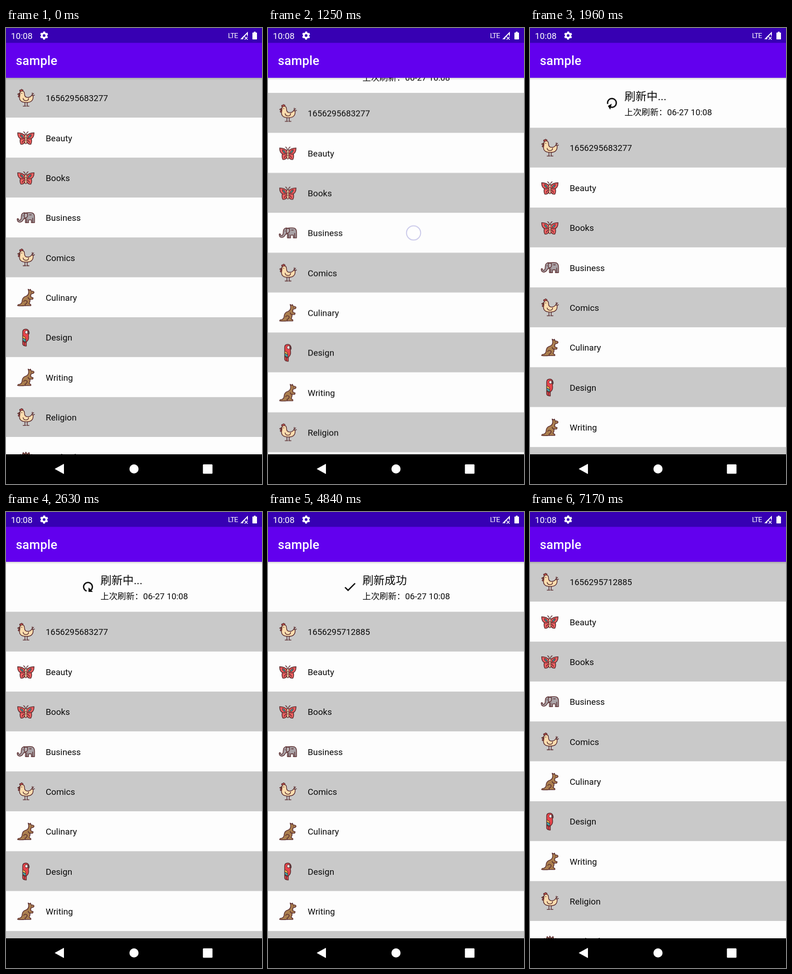
These frames come from a looping animation (561 px wide and 998 px high, 7210 ms). An HTML page:

```html
<!DOCTYPE html>
<html lang="zh-CN">
<head>
<meta charset="utf-8">
<title>Pull to refresh</title>
<style>
html, body { margin: 0; width: 100%; height: 100%; overflow: hidden; background: #fdfdfd; }
svg { overflow: hidden; }
#stage { display: block; width: 561px; height: 998px; }
text { font-family: Roboto, "Noto Sans CJK SC", "Noto Sans CJK", sans-serif; fill: #0a0a0a; white-space: pre; }
.label { font-size: 19px; }
.num { font-size: 18.7px; }
.state { font-size: 24.3px; }
.time { font-size: 18.7px; }
.art { stroke: #5b2e30; stroke-width: 1.6; stroke-linecap: round; stroke-linejoin: round; fill: none; }

/* every part shares one 7210 ms timeline */
#list, #finger, #arrow, #spinner, .pull, .ready, .busy, .done, .before {
  animation: 7210ms linear infinite;
}
#list { animation-name: list; }
#finger { animation-name: finger; }
#arrow { animation-name: arrow; }
#spinner { animation-name: spin; }
.pull, .ready, .busy, .done, .before { animation-timing-function: step-end; }
.pull { animation-name: pull; }
.ready { animation-name: ready; }
.busy { animation-name: busy; }
.done { animation-name: done; }
.before { animation-name: before; }

@keyframes list {
  0% { transform: translateY(0); }
  15.12% { transform: translateY(0); animation-timing-function: cubic-bezier(.5, 0, .8, .7); }
  17.34% { transform: translateY(33px); }
  20.8%, 22.61% { transform: translateY(142px); animation-timing-function: cubic-bezier(.37, 0, .63, 1); }
  25.38% { transform: translateY(109.3px); }
  73.23% { transform: translateY(109.3px); animation-timing-function: cubic-bezier(.37, 0, .63, 1); }
  77.18%, 100% { transform: translateY(0); }
}
@keyframes finger {
  0% { transform: translate(319px, 405px); opacity: 0; animation-timing-function: step-end; }
  13.87% { transform: translate(319px, 405px); opacity: 1; }
  15.12% { transform: translate(319px, 405px); opacity: 1; animation-timing-function: cubic-bezier(.5, 0, .8, .7); }
  17.34% { transform: translate(319px, 448px); opacity: 1; }
  20.8% { transform: translate(319px, 589.5px); opacity: 1; animation-timing-function: step-end; }
  22.61%, 100% { transform: translate(319px, 589.5px); opacity: 0; }
}
@keyframes arrow {
  0%, 20.18% { transform: rotate(0deg); }
  22.61%, 100% { transform: rotate(124deg); }
}
@keyframes spin {
  0%, 22.61% { transform: rotate(0deg); }
  66.44%, 100% { transform: rotate(1422deg); }
}
@keyframes pull { 0% { opacity: 1; } 20.18%, 100% { opacity: 0; } }
@keyframes ready { 0% { opacity: 0; } 20.18% { opacity: 1; } 22.61%, 100% { opacity: 0; } }
@keyframes busy { 0% { opacity: 0; } 22.61% { opacity: 1; } 66.44%, 100% { opacity: 0; } }
@keyframes done { 0% { opacity: 0; } 66.44%, 100% { opacity: 1; } }
@keyframes before { 0% { opacity: 1; } 22.61%, 100% { opacity: 0; } }
</style>
</head>
<body>
<svg id="stage" viewBox="0 0 561 998">
  <defs>
    <linearGradient id="shade" x2="0" y2="1">
      <stop offset="0" stop-color="#000" stop-opacity=".16"/>
      <stop offset="1" stop-color="#000" stop-opacity="0"/>
    </linearGradient>

    <g id="chicken" class="art">
      <path d="M6 5Q4 1 8 2Q9-1 11 1Q14 1 12 5Z" fill="#e25a55"/>
      <path d="M5 12Q1 15 3 17Q6 17 6 13Z" fill="#e25a55"/>
      <path d="M6 8L1 11L6 12Z" fill="#f0a04b"/>
      <path d="M6 10Q6 4 11 4Q16 4 16 10Q16 18 23 18Q29 18 32 13L35 15Q36 29 20 29Q5 29 5 18Q6 14 6 10Z" fill="#fbdcae"/>
      <path d="M13 20Q14 25 19 25Q25 25 25 20M32 13L36 9M34 14L38 13M33 12L33 8M17 29V37M22 29V37M13 37H19M21 37H26"/>
      <circle cx="10" cy="9" r="1" fill="#5b2e30" stroke="none"/>
    </g>

    <g id="wing" class="art">
      <path d="M18 15Q12 8 1 8Q1 18 7 21Q5 27 8 33Q15 34 18 26Z" fill="#ee5f60"/>
      <path d="M7 12Q13 13 14 19Q8 19 7 12Z" fill="#3fa3a5" stroke-width="1.2"/>
      <path d="M7 21Q12 22 17 20M11 29L15 24"/>
      <path d="M18 12Q17 7 14 6"/>
    </g>
    <g id="butterfly">
      <use href="#wing"/>
      <use href="#wing" transform="matrix(-1 0 0 1 38 0)"/>
      <g class="art">
        <rect x="17" y="12" width="4" height="20" rx="2" fill="#fbdcae" stroke-width="1.3"/>
        <path d="M17.5 19H20.5M17.5 24H20.5" stroke-width="1"/>
      </g>
    </g>

    <g id="elephant" class="art">
      <path d="M17 9Q28 7 34 9Q38 11 38 18V30H31V24H25V30H18V22Z" fill="#a9a2a6"/>
      <path d="M21 11Q18 7 13 9Q9 11 9 17Q9 25 5 25Q3 25 2 21L0 22Q0 29 6 29Q12 28 14 22Q20 21 21 11Z" fill="#a9a2a6"/>
      <path d="M16 10Q23 7 23 14Q22 20 17 20Q15 17 16 10Z" fill="#b9b2b5"/>
      <path d="M21 22V30M34 20V30M27 13H31"/>
      <circle cx="12.500" cy="15" r=".9" fill="#5b2e30" stroke="none"/>
    </g>

    <g id="kangaroo" class="art">
      <path d="M25 5L24 1L28 3L29 1L31 5Q37 5 37 8Q36 11 31 11Q29 14 30 18L35 20L34 23L28 23Q29 28 26 32L30 35V37H17Q9 38 1 37Q1 34 6 34Q11 32 11 25Q12 18 20 16Q26 13 25 5Z" fill="#ab7f4f"/>
      <path d="M24 19Q25 23 29 23M14 28Q18 23 22 28Q22 32 17 34L18 37"/>
      <circle cx="31" cy="7.500" r=".9" fill="#5b2e30" stroke="none"/>
    </g>

    <g id="parrot" class="art">
      <path d="M12 7Q12 1 19 1Q25 1 26 8Q24 11 25 17Q26 25 20 29V38Q13 38 12 34Z" fill="#e9454b"/>
      <path d="M18 5Q23 3 25 8Q23 12 19 11Q16 8 18 5Z" fill="#fff" stroke-width="1.1"/>
      <path d="M23 5Q28 6 26 12Q22 10 23 5Z" fill="#5b4a50" stroke-width="1.1"/>
      <path d="M12 16Q19 17 19 24L12 20Z" fill="#f4c24e" stroke-width="1.1"/>
      <path d="M12 20L19 24V29Q14 28 12 25Z" fill="#3fa3a5" stroke-width="1.1"/>
      <path d="M12 28L20 30M16 30V37"/>
    </g>

    <g id="spiky" class="art">
      <path d="M5 22L7 13L11 15L13 9L17 13L19 8L22 13L26 9L28 15L32 13L34 22Q32 35 19 35Q7 35 5 22Z" fill="#8b6a55"/>
    </g>
  </defs>

  <rect width="561" height="998" fill="#fdfdfd"/>

  <svg y="109" width="561" height="824">
    <g id="list">
      <g transform="translate(0 -109)">
        <g transform="translate(179.5 54.5) scale(1.364)">
          <g class="before"><g id="arrow">
            <path d="M-5.300-2.700L0 2.600L5.300-2.700" fill="none" stroke="#000" stroke-width="2"/>
          </g></g>
          <g class="busy"><g id="spinner">
            <path d="M6.700 2A7 7 0 1 1 5-5" fill="none" stroke="#000" stroke-width="2"/>
            <path d="M8-8V-1H1Z"/>
          </g></g>
          <path class="done" d="M-7.900.700L-3 5.600L8.300-5.700" fill="none" stroke="#000" stroke-width="2"/>
        </g>
        <g class="state">
          <text class="pull" x="207" y="49.200">下拉刷新</text>
          <text class="ready" x="207" y="49.200">释放立即刷新</text>
          <text class="busy" x="207" y="49.200">刷新中...</text>
          <text class="done" x="207" y="49.200">刷新成功</text>
        </g>
        <text class="time" x="207" y="81.700">上次刷新：06-27 10:08</text>
      </g>
      <g id="rows"></g>
    </g>
    <rect width="561" height="5" fill="url(#shade)"/>
  </svg>

  <rect width="561" height="109" fill="#6200ee"/>
  <rect width="561" height="32.500" fill="#3700b3"/>
  <text x="21.800" y="81.300" style="font-size:27.3px;font-weight:500;letter-spacing:.2px;fill:#fff">sample</text>

  <g fill="#fff">
    <text x="10.800" y="23.700" style="font-size:19px;fill:#fff">10:08</text>
    <g fill="none" stroke="#fff">
      <circle cx="83.500" cy="16.500" r="5" stroke-width="4"/>
      <circle cx="83.500" cy="16.500" r="7.600" stroke-width="2.600" stroke-dasharray="4.200 3.760" stroke-dashoffset="2.100" transform="rotate(30 83.500 16.500)"/>
    </g>
    <text x="486.500" y="22" style="font-size:15.5px;letter-spacing:-1px;fill:#fff">LTE</text>
    <path d="M513.500 24.500L530 8V17H528V13L520 21.500V24.500Z"/>
    <path d="M523 19L529.500 25.500M529.500 19L523 25.500" stroke="#fff" stroke-width="1.700"/>
    <path d="M543 8H547V10H549Q550 10 550 11V24Q550 25 549 25H541Q540 25 540 24V11Q540 10 541 10H543Z"/>
  </g>

  <rect y="933" width="561" height="65" fill="#000"/>
  <g fill="#fff">
    <path d="M107.500 965L126.500 954.500V975.500Z" stroke="#fff" stroke-linejoin="round"/>
    <circle cx="280.500" cy="965" r="10"/>
    <rect x="431.500" y="955" width="21" height="20.500" rx="1.500"/>
  </g>

  <g id="finger">
    <circle r="15.500" fill="#fff" fill-opacity=".5" stroke="#c6c5e8" stroke-width="2"/>
  </g>
</svg>
<script>
const ROW = 87.35;
const items = [
  ["chicken", ""], ["butterfly", "Beauty"], ["butterfly", "Books"],
  ["elephant", "Business"], ["chicken", "Comics"], ["kangaroo", "Culinary"],
  ["parrot", "Design"], ["kangaroo", "Writing"], ["chicken", "Religion"],
  ["spiky", "Medical"]
];

const label = (text, cls) => `<text class="${cls}" x="87" y="51.2">${text}</text>`;

// The first row shows the time of the last load.
const stamp =
  `<g class="pull">${label("1656295683277", "num")}</g>` +
  `<g class="ready">${label("1656295683277", "num")}</g>` +
  `<g class="busy">${label("1656295683277", "num")}</g>` +
  `<g class="done">${label("1656295712885", "num")}</g>`;

document.getElementById("rows").innerHTML = items.map(([icon, name], i) =>
  `<g transform="translate(0 ${i * ROW})">
    <rect width="561" height="${ROW}" fill="${i % 2 ? "#fdfdfd" : "#c9c9c9"}"/>
    <use href="#${icon}" x="24.5" y="25"/>
    ${name ? label(name, "label") : stamp}
  </g>`).join("");
</script>
</body>
</html>
```
